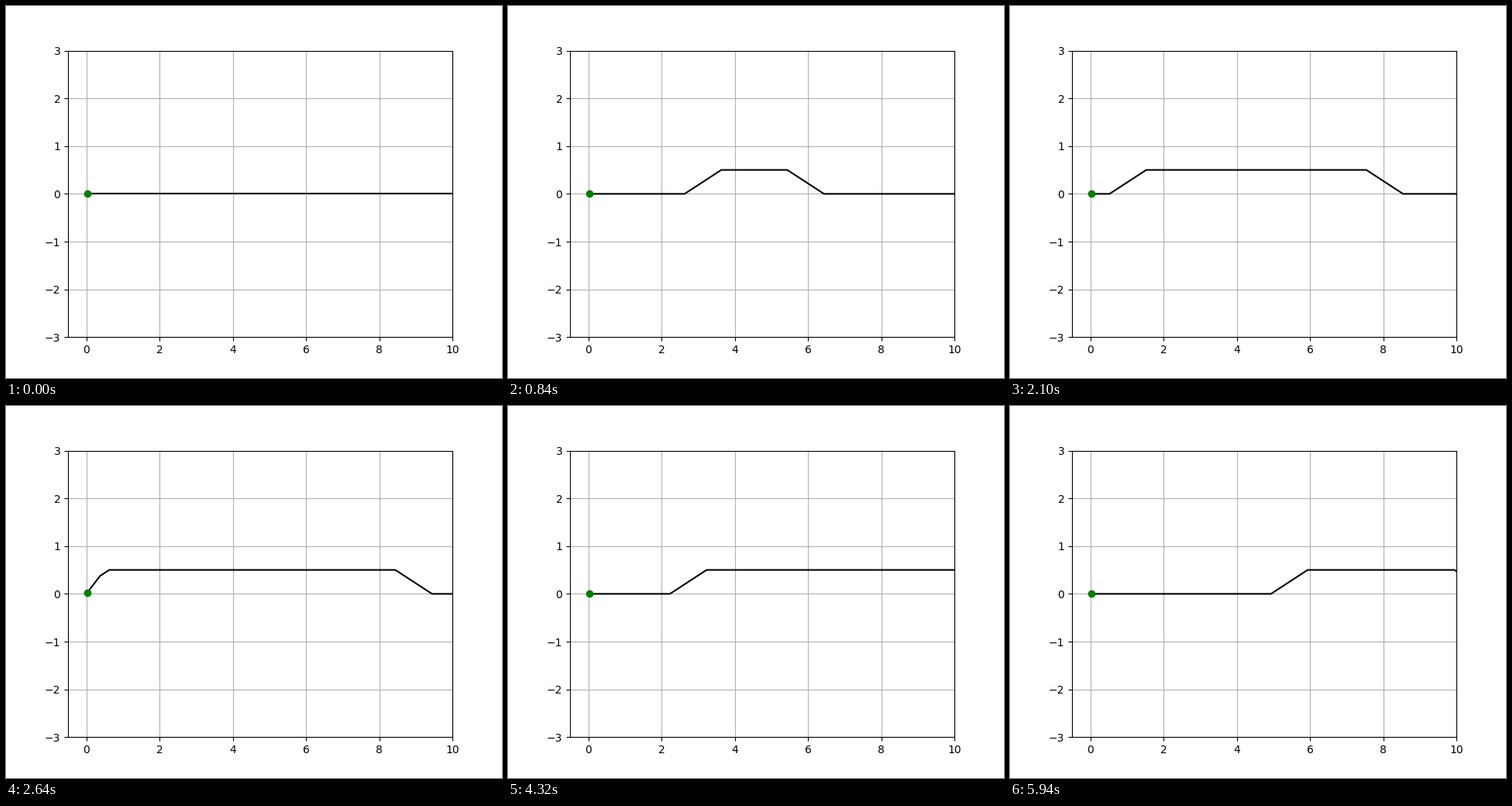
Write a matplotlib script that moves like this. It is 640 px wide and 480 px high and loops after 6 s.

```python
import matplotlib.pyplot as plt
import numpy as np
from matplotlib.animation import FuncAnimation

FRAMES = 100
DX = 25 / 499          # node spacing; the wave travels two nodes per frame
NEAR, FAR = 80, 100    # nodes between which the string is struck

nodes = np.arange(220)
xs = (nodes + 0.5) * DX


def ramp(k):
    """Half the integral of the starting velocity up to node k."""
    return np.clip(k - NEAR, 0, FAR - NEAR) * DX / 2


def wave(n):
    """Right half of a struck string with fixed ends."""
    s = 2 * n
    at_wall = 1 if NEAR <= s <= FAR else 0
    behind = nodes - s
    mirrored = np.where(behind < 0, -behind - at_wall, behind)
    far_echo = np.clip(nodes + s - 396, 0, 20) * DX / 2
    return ramp(nodes + s) - ramp(mirrored) - far_echo


fig, ax = plt.subplots(figsize=(6.4, 4.8), dpi=100)
ax.set_xlim(-0.5, 10)
ax.set_ylim(-3, 3)
ax.grid()
string, = ax.plot(xs, wave(0), color="black", lw=1.5)
end, = ax.plot(xs[:1], [0], "o", color="green", ms=6)


def update(n):
    u = wave(n)
    string.set_ydata(u)
    end.set_ydata(u[:1])
    return string, end


anim = FuncAnimation(fig, update, frames=FRAMES, interval=60, repeat=True,
                     repeat_delay=0, blit=False)
plt.show()
```
